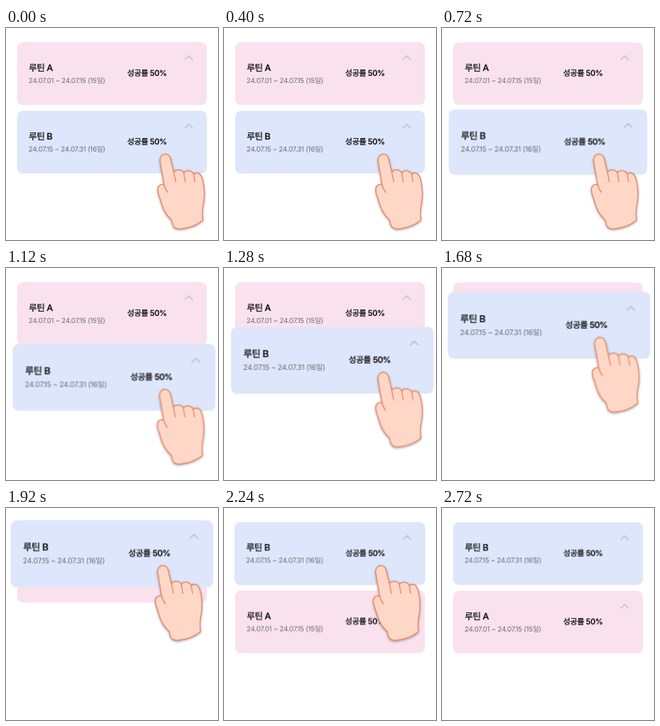
Write an HTML page that moves like this. It is 266 by 266 pixels and loops after 8000 ms.

```html
<!DOCTYPE html>
<html lang="ko">
<head>
<meta charset="utf-8">
<title>Routine reorder</title>
<style>
  html, body { margin: 0; width: 100%; height: 100%; overflow: hidden; background: #fff; }
  svg { display: block; width: 266px; height: 266px; }
  text { font-family: Inter, "Noto Sans CJK KR", "Noto Sans CJK", sans-serif; text-rendering: geometricPrecision; }
  .title, .rate { font-weight: 500; fill: #0c0c0e; stroke: #0c0c0e; stroke-width: .22px; }
  .title { font-size: 11.3px; letter-spacing: -.45px; }
  .rate { font-size: 9.9px; letter-spacing: -.33px; }
  .date { font-size: 8.7px; letter-spacing: -.22px; fill: #6d6d73; }
  .chevron { fill: none; stroke: #c3c2c8; stroke-width: 1.4; stroke-linecap: round; stroke-linejoin: round; }
  .pink { fill: #fae1ee; }
  .blue { fill: #dde6fa; }
  .hand { stroke: #ea8c69; stroke-width: 1.3; stroke-linecap: round; stroke-linejoin: round;
          filter: drop-shadow(0 1px 1.5px rgba(70, 70, 80, .5)); }

  /* 1% of the loop is one 80 ms step */
  .slide, .drag, .lift, .hand { animation: 8s infinite both; }
  .slide { animation-name: slide; animation-timing-function: step-end; }
  .drag { animation-name: drag; }
  .lift { animation-name: lift; transform-origin: 133px 57.2px; }
  .hand { animation-name: hand; }

  @keyframes slide {
    0%, 22% { transform: translateY(0); }
    23% { transform: translateY(6px); }
    24% { transform: translateY(22px); }
    25% { transform: translateY(45px); }
    26% { transform: translateY(66px); }
    27% { transform: translateY(79px); }
    28% { transform: translateY(85.6px); }
    29%, 100% { transform: translateY(86px); }
  }
  @keyframes drag {
    0%, 11% { transform: translate(0, 0); animation-timing-function: steps(3); }
    14% { transform: translate(2.5px, -6px); animation-timing-function: steps(1); }
    15% { transform: translate(2.8px, -15px); animation-timing-function: steps(2); }
    17% { transform: translate(3px, -40px); animation-timing-function: steps(1); }
    18% { transform: translate(3px, -48px); animation-timing-function: steps(4); }
    22% { transform: translate(.8px, -79px); animation-timing-function: steps(2); }
    24%, 100% { transform: translate(0, -86px); }
  }
  @keyframes lift {
    0%, 6% { transform: scale(1); animation-timing-function: steps(3); }
    9% { transform: scale(1.046); animation-timing-function: steps(2); }
    11%, 24% { transform: scale(1.068); animation-timing-function: steps(1); }
    25% { transform: scale(1.058); animation-timing-function: steps(2); }
    27% { transform: scale(1.018); animation-timing-function: steps(1); }
    28% { transform: scale(1.006); animation-timing-function: steps(2); }
    30%, 100% { transform: scale(1); }
  }
  @keyframes hand {
    0%, 6% { transform: translateX(0); opacity: 1; animation-timing-function: steps(3); }
    9%, 31% { transform: translateX(-3px); opacity: 1; animation-timing-function: steps(3); }
    34%, 100% { transform: translateX(-3px); opacity: 0; }
  }
</style>
</head>
<body>
<svg viewBox="0 0 266 266">
  <g class="slide">
    <rect class="pink" x="14" y="18" width="238" height="78.5" rx="7"/>
    <text class="title" x="28.5" y="54">루틴 A</text>
    <text class="date" x="28.3" y="69">24.07.01 ~ 24.07.15 (15일)</text>
    <text class="rate" x="152" y="60.3">성공률 50%</text>
    <path class="chevron" d="M224.5 39.5l4.7-4.5 4.7 4.5"/>
  </g>
  <g class="drag">
    <g transform="translate(0 86)">
      <g class="lift">
        <rect class="blue" x="14" y="18" width="238" height="78.5" rx="7"/>
        <text class="title" x="28.5" y="54">루틴 B</text>
        <text class="date" x="28.3" y="69">24.07.15 ~ 24.07.31 (16일)</text>
        <text class="rate" x="152" y="60.3">성공률 50%</text>
        <path class="chevron" d="M224.5 39.5l4.7-4.5 4.7 4.5"/>
      </g>
    </g>
    <g class="hand">
      <path fill="#fed7c7" d="M198.500 197L193.500 168C192 157 204 155 206.500 164L210.500 181C213 177 221 177 223 182C226 177.500 233 178.500 235.500 183.500C239 180 244 182 246 188C249 198 249.500 209 248 219C246 227 246 234 247 241C240 247 229 251 219 252C212 252.500 209 250 208 241C201 235 197 228 194.500 218C193 212 190 208 190.500 202C191 197 195 195.500 198.500 197Z"/>
      <path fill="none" d="M198.500 197Q200 203 203 206M210.500 181L213 193M223 182L225 193M235.500 183.500L237 193"/>
    </g>
  </g>
</svg>
</body>
</html>
```
